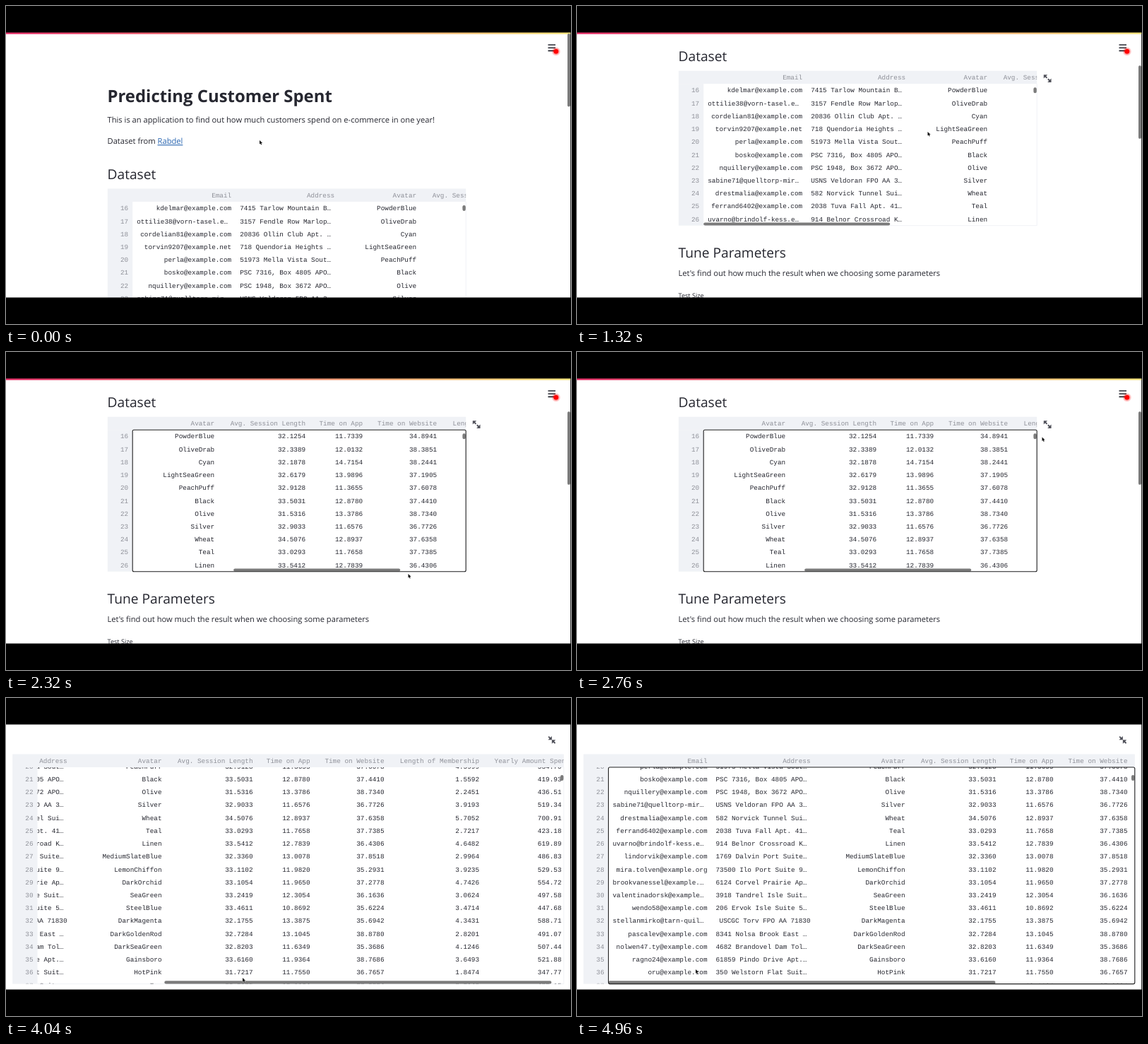
An HTML page that plays this animation: 800 px wide and 450 px high, repeating every 5 s.

```html
<!DOCTYPE html>
<html lang="en">
<head>
<meta charset="utf-8">
<title>Predicting Customer Spent</title>
<style>
html, body { margin: 0; width: 100%; height: 100%; overflow: hidden; background: #000; }
svg { display: block; width: 800px; height: 450px; }
text { font-family: "Open Sans", "Noto Sans", sans-serif; font-size: 11.16px; fill: #262730; text-rendering: geometricPrecision; white-space: pre; }
.h1 { font-size: 23.9px; font-weight: 700; }
.h2 { font-size: 19.2px; font-weight: 400; }
.small { font-size: 9.1px; }
.link { fill: #2a66b1; text-decoration: underline; }
.grid text { font-family: "Liberation Mono", "Noto Sans Mono", monospace; font-size: 9.35px; }
.grid .dim { fill: #8f9199; }
.thumb { fill: #7b7b7b; }
.icon { fill: #50515a; }
</style>
</head>
<body>
<svg viewBox="0 0 800 450" id="stage">
  <defs>
    <linearGradient id="strip"><stop offset="0" stop-color="#e8306a"/><stop offset="1" stop-color="#f8e67c"/></linearGradient>
    <radialGradient id="glow"><stop offset=".45" stop-color="#f00" stop-opacity=".55"/><stop offset="1" stop-color="#f00" stop-opacity="0"/></radialGradient>
  </defs>
  <rect y="37" width="799.2" height="376" fill="#fff"/>
  <g id="normal">
    <g id="page">
      <text class="h1" x="143.5" y="136">Predicting Customer Spent</text>
      <text x="143.5" y="165.2">This is an application to find out how much customers spend on e-commerce in one year!</text>
      <text x="143.5" y="195.2">Dataset from <tspan class="link">Rabdel</tspan></text>
      <text class="h2" x="143.5" y="245">Dataset</text>
      <text class="h2" x="143.5" y="522.5">Tune Parameters</text>
      <text x="143.5" y="549.2">Let's find out how much the result when we choosing some parameters</text>
      <text class="small" x="143.5" y="579.4">Test Size</text>
      <path id="expand" class="icon" transform="translate(660.8 264) scale(1.34)" d="M0 0v4l1.5-1.5 1.5 1.5 1-1-1.5-1.5 1.5-1.5h-4zm5 4l-1 1 1.5 1.5-1.5 1.5h4v-4l-1.5 1.5-1.5-1.5z"/>
    </g>
    <rect y="37" width="799.2" height="2.8" fill="url(#strip)"/>
    <path d="M767.5 55h10.5M767.5 59.2h10.5M767.5 63.4h10.5" stroke="#262730" stroke-width="1.6"/>
    <circle cx="778.8" cy="64.3" r="6.5" fill="url(#glow)"/>
    <circle cx="778.8" cy="64.3" r="3.3" fill="#f00"/>
    <rect id="bar" class="thumb" x="795" y="39" width="4" height="103.5" rx="1.9"/>
  </g>
  <g id="full">
    <path class="icon" transform="translate(767.5 54) scale(1.34)" d="M1 0l-1 1 1.5 1.5-1.5 1.5h4v-4l-1.5 1.5-1.5-1.5zm3 4v4l1.5-1.5 1.5 1.5 1-1-1.5-1.5 1.5-1.5h-4z"/>
  </g>
  <path d="M0 0h800v37.6H0zM0 412.4h800v37.6H0z"/>
  <path id="cursor" d="M0 0v5.6l1.3-1.2 .9 2 1-.4-.9-2h1.8z" fill="#111" stroke="#fff" stroke-width=".5" paint-order="stroke"/>
</svg>
<script>
const $ = id => document.getElementById(id);
const LOOP = 5000, STEP = 40, ROW = 18.22, FIRST = 16, NOTCH = 83.4;
const heads = ["Email", "Address", "Avatar", "Avg. Session Length", "Time on App",
  "Time on Website", "Length of Membership", "Yearly Amount Spent"];
const rights = [140, 286, 402, 531, 612, 717, 851.5, 968];
const rows = `kdelmar@example.com|7415 Tarlow Mountain B…|PowderBlue|32.1254|11.7339|34.8941|3.1361|457.84
ottilie38@vorn-tasel.e…|3157 Fendle Row Marlop…|OliveDrab|32.3389|12.0132|38.3851|2.4208|407.70
cordelian81@example.com|20836 Ollin Club Apt. …|Cyan|32.1878|14.7154|38.2441|1.5166|452.31
torvin9207@example.net|718 Quendoria Heights …|LightSeaGreen|32.6179|13.9896|37.1905|4.0645|605.06
perla@example.com|51973 Mella Vista Sout…|PeachPuff|32.9128|11.3655|37.6078|4.5999|534.70
bosko@example.com|PSC 7316, Box 4805 APO…|Black|33.5031|12.8780|37.4410|1.5592|419.93
nquillery@example.com|PSC 1948, Box 3672 APO…|Olive|31.5316|13.3786|38.7340|2.2451|436.51
sabine71@quelltorp-mir…|USNS Veldoran FPO AA 3…|Silver|32.9033|11.6576|36.7726|3.9193|519.34
drestmalia@example.com|582 Norvick Tunnel Sui…|Wheat|34.5076|12.8937|37.6358|5.7052|700.91
ferrand6402@example.com|2038 Tuva Fall Apt. 41…|Teal|33.0293|11.7658|37.7385|2.7217|423.18
uvarno@brindolf-kess.e…|914 Belnor Crossroad K…|Linen|33.5412|12.7839|36.4306|4.6482|619.89
lindorvik@example.com|1769 Dalvin Port Suite…|MediumSlateBlue|32.3360|13.0078|37.8518|2.9964|486.83
mira.tolven@example.org|73500 Ilo Port Suite 9…|LemonChiffon|33.1102|11.9820|35.2931|3.9235|529.53
brookvanessel@example.…|6124 Corvel Prairie Ap…|DarkOrchid|33.1054|11.9650|37.2778|4.7426|554.72
valentinadorsk@example…|3918 Tandrel Isle Suit…|SeaGreen|33.2419|12.3054|36.1636|3.0624|497.58
wendo58@example.com|206 Ervok Isle Suite 5…|SteelBlue|33.4611|10.8692|35.6224|3.4714|447.68
stellanmirko@tarn-quil…|USCGC Torv FPO AA 71830|DarkMagenta|32.1755|13.3875|35.6942|4.3431|588.71
pascalev@example.com|8341 Nolsa Brook East …|DarkGoldenRod|32.7284|13.1045|38.8780|2.8201|491.07
nolwen47.ty@example.com|4682 Brandovel Dam Tol…|DarkSeaGreen|32.8203|11.6349|35.3686|4.1246|507.44
ragno24@example.com|61859 Pindo Drive Apt.…|Gainsboro|33.6160|11.9364|38.7686|3.6493|521.88
oru@example.com|350 Welstorn Flat Suit…|HotPink|31.7217|11.7550|36.7657|1.8474|347.77
tamsel@example.com|482 Orbin Meadow Suite…|Tan|32.8135|12.1164|37.0824|3.2140|482.15`
  .split("\n").map(r => r.split("|"));

function add(parent, tag, attrs = {}, content) {
  const el = document.createElementNS("http://www.w3.org/2000/svg", tag);
  for (const k in attrs) el.setAttribute(k, attrs[k]);
  if (content) el.textContent = content;
  parent.appendChild(el);
  return el;
}

// A table with fixed header and index column; returns a scroll function.
function makeGrid(parent, id, g) {
  const root = add(parent, "g", { class: "grid" });
  const body = g.top + 18.5, w = g.right - g.left, h = g.bottom - body;
  function layer(name, x, y, width, height) {
    const clip = add(root, "clipPath", { id: id + name });
    add(clip, "rect", { x, y, width, height });
    return add(add(root, "g", { "clip-path": `url(#${id + name})` }), "g");
  }
  function label(to, s, x, y, dim, anchor = "end") {
    add(to, "text", { x, y: y + 3.1, "text-anchor": anchor, class: dim ? "dim" : "" }, s);
  }
  add(root, "rect", { x: g.edge, y: g.top, width: g.right - g.edge, height: 18.5, fill: "#f0f2f6" });
  add(root, "rect", { x: g.edge, y: body, width: g.left - g.edge, height: h, fill: "#f0f2f6" });
  add(root, "path", { d: `M${g.right} ${body}V${g.bottom}H${g.left}`, fill: "none", stroke: "#f0f2f6" });
  const head = layer("head", g.left, g.top, w, 18.5);
  const index = layer("index", g.edge, body, g.left - g.edge, h);
  const cells = layer("cells", g.left, body, w, h);
  const colX = c => g.left + rights[c] + (c > 1 ? g.extra : 0);

  heads.forEach((s, c) => label(head, s, colX(c) + (c === 7 ? 11.6 : 0), g.top + 9.5, true));
  rows.forEach((r, i) => {
    const y = body + 9.2 + i * ROW;
    label(index, String(FIRST + i), g.left - 6, y, true);
    r.forEach((s, c) => {
      if (s.endsWith("…")) label(cells, s, colX(c) - 134, y, false, "start");
      else label(cells, s, colX(c), y);
    });
  });
  const vBar = add(root, "rect", { class: "thumb", x: g.right - 4.8, width: 4.4, height: 8, rx: 2.2 });
  const hBar = add(root, "rect", { class: "thumb", y: g.bottom - 4.3, height: 4.2, rx: 2.1 });
  const focus = add(root, "rect", { x: g.left, y: body, width: w, height: h, rx: 2, fill: "none", stroke: "#222", "stroke-width": 1.1 });

  return (sx, sy, focused, ratio, thumb) => {
    head.setAttribute("transform", `translate(${-sx} 0)`);
    index.setAttribute("transform", `translate(0 ${-sy})`);
    cells.setAttribute("transform", `translate(${-sx} ${-sy})`);
    vBar.setAttribute("y", body + g.vOff + sy * 0.036);
    hBar.setAttribute("x", g.left + sx * ratio);
    hBar.setAttribute("width", thumb);
    focus.style.display = focused ? "" : "none";
  };
}

const scrollSmall = makeGrid($("page"), "s", { edge: 143.8, left: 179.2, top: 258.5, right: 651.2, bottom: 477.5, extra: 0, vOff: 5 });
const scrollFull = makeGrid($("full"), "f", { edge: 9.2, left: 44.5, top: 79.5, right: 789.8, bottom: 404.6, extra: 18, vOff: 8 });

const ease = p => p * p * (3 - 2 * p);
const ramp = (t, a, b) => ease(Math.min(1, Math.max(0, (t - a) / (b - a))));

// Pointer path: time, x, y
const path = [[80, 359, 190], [640, 260.5, 134], [760, 260.5, 134], [1280, 496.5, 178], [1360, 496.5, 178],
  [1720, 428, 307], [2280, 569.5, 314], [2400, 569.5, 314], [2840, 667, 102], [2960, 667, 102],
  [3320, 289, 155], [3640, 289, 155], [4040, 335, 396], [4200, 348, 401], [4800, 168, 384]];

function pointer(t) {
  let x = path[0][1], y = path[0][2];
  for (let i = 1; i < path.length; i++) {
    const a = path[i - 1], b = path[i], p = ramp(t, a[0], b[0]);
    x += (b[1] - a[1]) * p;
    y += (b[2] - a[2]) * p;
  }
  return [x, y];
}

function draw(t) {
  const isFull = t >= 2960;
  $("normal").style.display = isFull ? "none" : "";
  $("full").style.display = isFull ? "" : "none";

  const top = NOTCH * (ramp(t, 360, 520) + ramp(t, 880, 1040));
  $("page").setAttribute("transform", `translate(0 ${-top})`);
  $("bar").setAttribute("y", 39 + top * 0.272);
  $("expand").style.display = t >= 960 ? "" : "none";

  const drag = ramp(t, 1720, 2280);
  scrollSmall(286 * drag, 0, t >= 1720, 0.5, 264 - 28 * drag);
  scrollFull(244 * (1 - ramp(t, 4200, 4800)), NOTCH * ramp(t, 3480, 3640), t >= 4200, 0.737, 548);

  $("cursor").setAttribute("transform", `translate(${pointer(t)})`);
}

const start = performance.now();
function tick() {
  const t = (performance.now() - start) % LOOP;
  draw(Math.floor(t / STEP) * STEP);
  requestAnimationFrame(tick);
}
tick();
</script>
</body>
</html>
```
